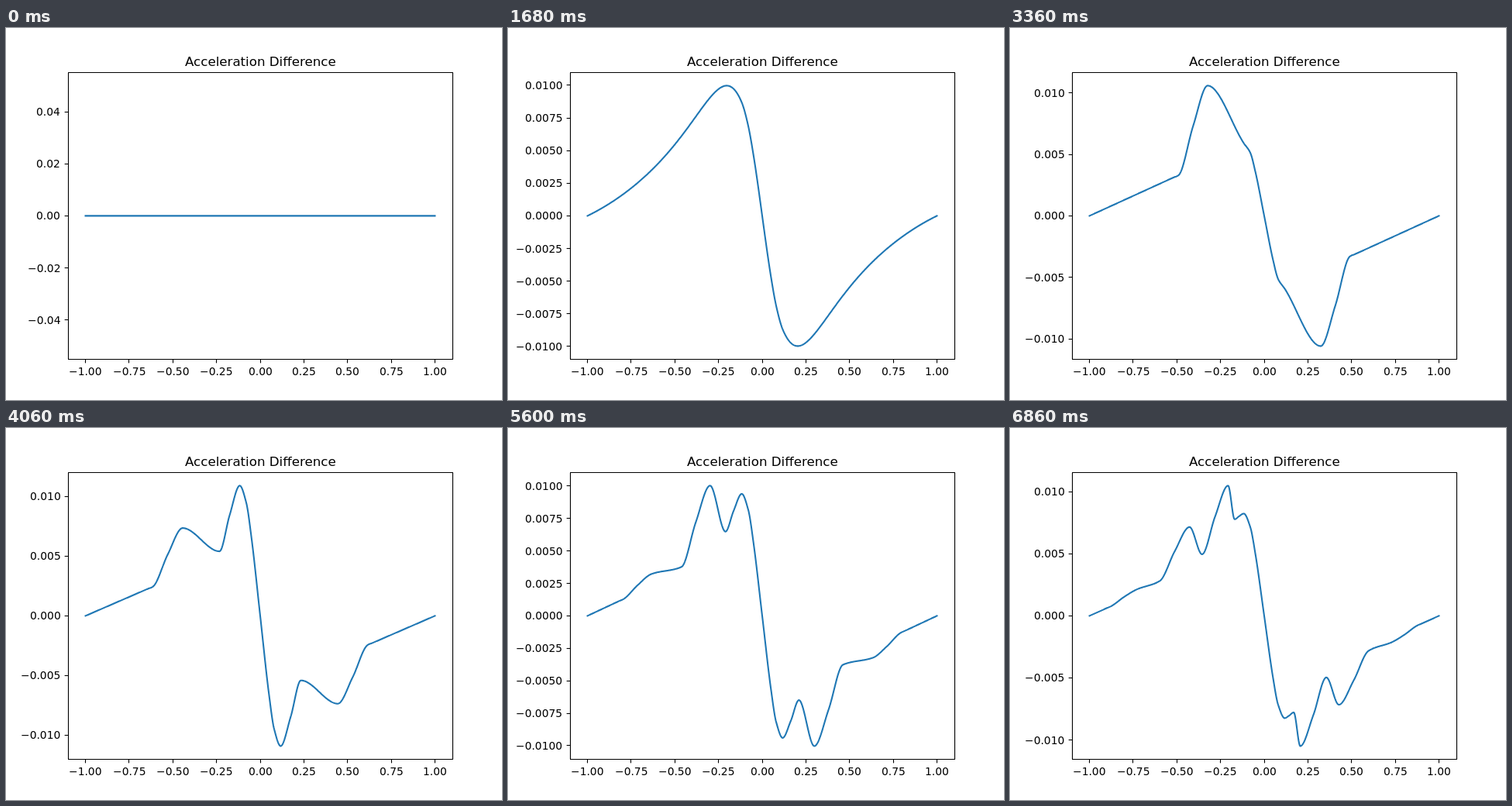
These frames come from a looping animation (640 px wide and 480 px high, 7 s). An HTML page with a canvas:

```html
<!DOCTYPE html>
<html lang="en">
<head>
<meta charset="utf-8">
<title>Acceleration Difference</title>
<style>
  html, body { margin: 0; width: 100%; height: 100%; overflow: hidden; background: #fff; }
  canvas { display: block; }
</style>
</head>
<body>
<canvas id="stage" width="640" height="480"></canvas>
<script>
const ctx = document.getElementById('stage').getContext('2d');
const STEP_MS = 140, STEPS = 50;
const box = { left: 80, right: 576, top: 57.6, bottom: 427.2 };
const midX = 328, midY = 242.4, unitX = 496 / 2.2, halfHeight = 184.8;
const CORE = .117;

const clamp = v => Math.min(1, Math.max(0, v));
const mix = (a, b, s) => a + (b - a) * s;
const smooth = s => s * s * (3 - 2 * s);

// Monotone cubic through points with rising x.
function curve(nodes) {
  const slopes = nodes.slice(1).map(([x, y], i) => (y - nodes[i][1]) / (x - nodes[i][0]));
  const tangents = nodes.map((_, i) => {
    const a = slopes[i - 1] ?? slopes[i], b = slopes[i] ?? a;
    return a * b > 0 ? 2 * a * b / (a + b) : 0;
  });
  return x => {
    let i = 0;
    while (i < slopes.length - 1 && x > nodes[i + 1][0]) i++;
    const [x0, y0] = nodes[i], [x1, y1] = nodes[i + 1];
    const h = x1 - x0, s = (x - x0) / h, r = 1 - s;
    return mix(y0, y1, smooth(s)) + h * s * r * (tangents[i] * r - tangents[i + 1] * s);
  };
}

// First outburst: one broad hump that grows and widens.
function outburst(t) {
  const size = 39.5 * Math.sin(Math.PI / 2 * clamp(t / 6.5));
  const width = .2 + .012 * Math.min(t, 7);
  return r => size * r / width * (1 - r) / (1 + (r / width) ** 2.25);
}

// Later, a winding spiral: fronts leave the core in turn and slow down further out.
function fronts(t) {
  const rim = 6.3 + 1.1 * Math.exp((17 - t) / 4);
  const core = 8.75 + 4.92 * Math.min(1, Math.exp((17 - t) / 15))
    * Math.cos(2 * Math.PI * (t - 17) / 12.4);
  const points = [[1, 0]];

  for (let n = 1; ; n++) {
    const foot = 1 - Math.exp(-.076 * (t / (n + .36) - 8.8));
    if (foot < .14) break;
    const top = foot - .17 + .35 * (foot - .6) ** 2;
    const free = top > .13;
    const lift = 9.3 * .82 ** (n - 1) / (1 + (top / .5) ** 6);
    const peak = free ? [top, (7 + lift) * (1 - top)] : [CORE, core];
    const floor = (rim + .7 * (n - 1)) * (1 - foot);
    const footY = mix(core, floor, clamp((foot - .14) / .08));

    if (n === 1) points.push([foot + .03, rim * (.97 - foot)]);
    points.push([foot, footY], [mix(foot, peak[0], .5), mix(footY, peak[1], .55)]);
    if (free) points.push(peak);
  }
  points.push([CORE, core], [.08, core * .87], [.05, core * .6], [0, 0]);
  return curve(points.reverse());
}

function curveAt(t) {
  const early = outburst(t), late = fronts(Math.max(t, 7));
  const blend = smooth(clamp((t - 7) / 10));
  return x => {
    const r = Math.abs(x);
    return -Math.sign(x) * mix(early(r), late(r), blend);
  };
}

const crisp = v => Math.floor(v) + .5;
const label = (value, digits) => value.toFixed(digits).replace('-', '\u2212');

function line(x0, y0, x1, y1) {
  ctx.beginPath();
  ctx.moveTo(x0, y0);
  ctx.lineTo(x1, y1);
  ctx.stroke();
}

// anchor: 0.5 centres the text on x, 1 ends it there.
function text(string, x, y, anchor, size = 13.889) {
  ctx.font = `${size}px "DejaVu Sans", sans-serif`;
  ctx.fillText(string, Math.round(x - anchor * ctx.measureText(string).width), y);
}

function drawAxes(limit) {
  ctx.strokeStyle = ctx.fillStyle = '#000';
  ctx.lineWidth = 1.11;
  ctx.lineCap = 'butt';
  const left = crisp(box.left), top = crisp(box.top), bottom = crisp(box.bottom);
  ctx.strokeRect(left, top, crisp(box.right) - left, bottom - top);
  text('Acceleration Difference', midX, 49, .5, 16.667);

  for (let k = -4; k <= 4; k++) {
    const x = midX + k / 4 * unitX;
    line(crisp(x), bottom, crisp(x), bottom + 4.86);
    text(label(k / 4, 2), x, 448, .5);
  }

  // Round step that gives at most nine intervals.
  const raw = 2 * limit / 9, base = 10 ** Math.floor(Math.log10(raw));
  const factor = [1, 2, 2.5, 5, 10].find(m => m * base >= raw);
  const step = factor * base;
  const digits = 3 - Math.floor(Math.log10(step)) + (factor === 2.5);
  const count = Math.floor(limit / step);
  for (let k = -count; k <= count; k++) {
    const y = midY - k * step / limit * halfHeight;
    line(left - 4.86, crisp(y), left, crisp(y));
    text(label(k * step / 1000, digits), 70.3, Math.round(y + 5), 1);
  }
}

function draw(step) {
  const f = curveAt(step);
  const samples = Array.from({ length: 801 }, (_, i) => {
    const x = i / 400 - 1;
    return [x, f(x)];
  });
  const peak = Math.max(...samples.map(p => p[1]));
  const limit = peak > 0 ? peak * 1.1 : 55;

  ctx.fillStyle = '#fff';
  ctx.fillRect(0, 0, 640, 480);
  ctx.strokeStyle = '#1f77b4';
  ctx.lineWidth = 2.083;
  ctx.lineCap = 'square';
  ctx.lineJoin = 'round';
  ctx.beginPath();
  for (const [x, y] of samples) ctx.lineTo(midX + x * unitX, midY - y / limit * halfHeight);
  ctx.stroke();
  drawAxes(limit);
}

const start = performance.now();
function tick() {
  draw(Math.floor((performance.now() - start) / STEP_MS) % STEPS);
  requestAnimationFrame(tick);
}
tick();
</script>
</body>
</html>
```
